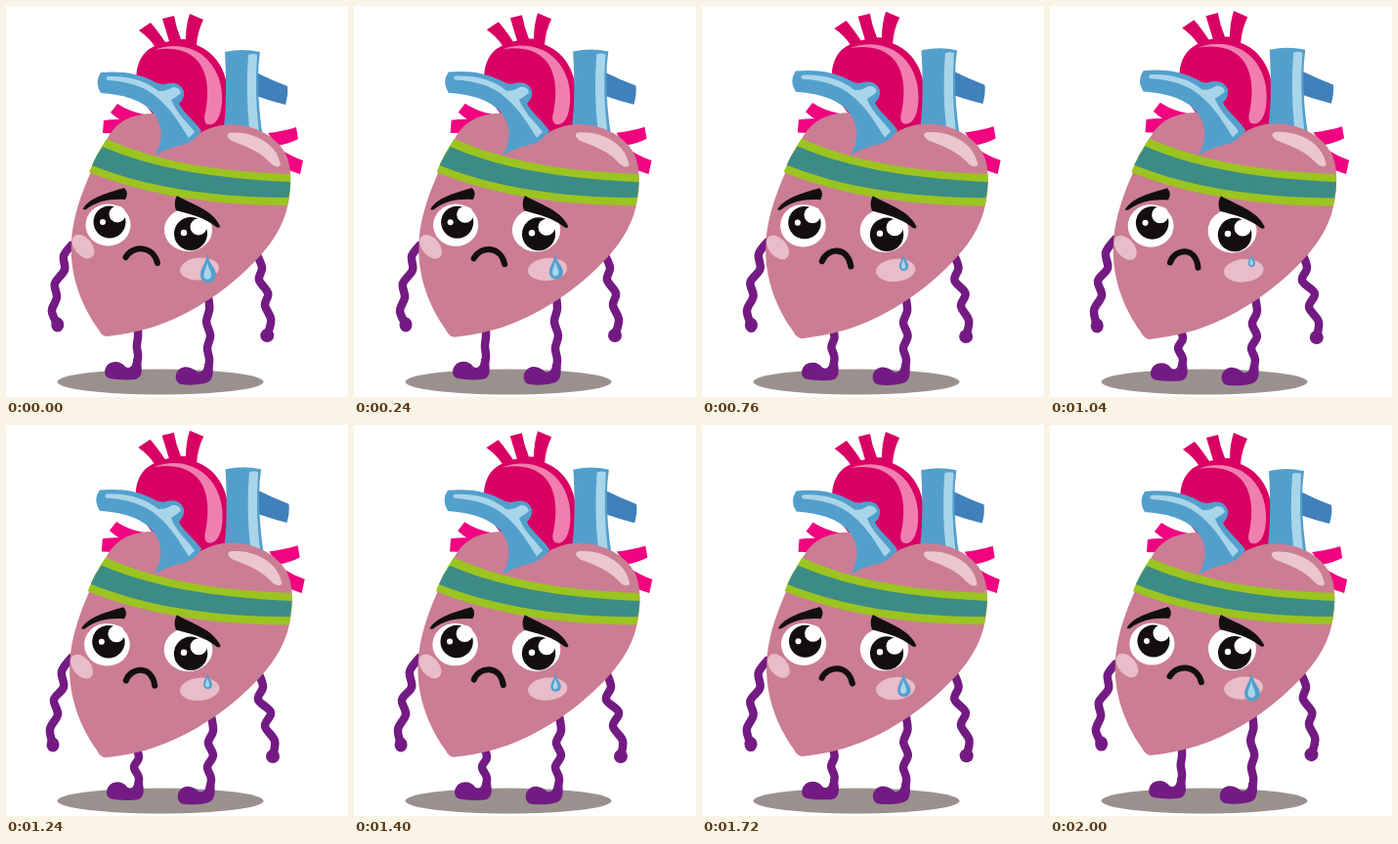
Write an HTML page that moves like this. It is 350 px wide and 400 px high and loops after 2040 ms.

```html
<!DOCTYPE html>
<html lang="en">
<head>
<meta charset="utf-8">
<title>Tired heart</title>
<style>
  html, body { margin: 0; width: 100%; height: 100%; overflow: hidden; background: #fff; }
  svg { display: block; width: 100vw; height: 100vh; }
  .limb { fill: none; stroke: #731b83; stroke-width: 8.5; stroke-linecap: round; stroke-linejoin: round; }
  .purple { fill: #731b83; }
  .pink { fill: #f0047f; }
  .blue { fill: #539fcc; }
  .pale { fill: #a9d5ea; }
  .blush { fill: #e8bcc8; }
  .ink { fill: #130f10; }
</style>
</head>
<body>
<svg viewBox="0 0 350 400">
  <ellipse cx="158" cy="384.5" rx="105.5" ry="13" fill="#9a918e"/>

  <path id="armL" class="limb"/>
  <path id="armR" class="limb"/>
  <path id="legL" class="limb"/>
  <path id="legR" class="limb"/>
  <ellipse id="handL" class="purple" rx="6.5" ry="7.5"/>
  <ellipse id="handR" class="purple" rx="7" ry="7"/>
  <path id="footL" class="purple" d="M137 361C140 372 140 381 131 382C122 383 112 382 106 381C99 379 100 370 105 366C111 362 119 364 122 369C127 372 130 368 130 361Z"/>
  <path id="footR" class="purple" d="M211 366C213 377 211 385 203 386C195 388 186 388 179 387C172 385 172 375 178 371C184 367 191 370 195 374C200 376 203 372 203 366Z"/>

  <g id="heart">
    <g class="pink">
      <path d="M114 100Q126 108 142 111L130 124Q117 118 107 109Z"/>
      <path d="M100 117Q114 115 128 117L114 131Q106 130 99 130Z"/>
      <path d="M268 130Q284 128 297 124L299 136Q290 141 277 143Z"/>
      <path d="M280 146Q292 154 304 158L301 172Q289 168 279 164Z"/>
    </g>

    <path fill="#d80063" d="M136 25L148 17Q155 25 163 37L167 36Q163 23 160 13L172 10Q174 22 179 34L184 34Q184 20 188 8L202 14Q196 26 195 40C214 47 227 66 227 92Q227 112 221 132L180 150L136 92C130 70 134 49 152 41Q146 32 136 25Z"/>
    <path fill="#f07fb0" d="M152 45C165 39 182 40 194 46C212 55 222 75 221 97Q220 117 211 121Q203 123 203 114C208 93 208 70 196 56C185 44 168 42 152 45Z"/>

    <path fill="#4080bb" d="M256 68Q272 76 288 82Q289 91 286 101Q270 97 256 92Z"/>
    <path class="blue" d="M224 47Q242 43 260 47Q258 60 258 75Q258 104 263 135L222 130Q227 100 224 47Z"/>
    <path class="pale" d="M248 50Q253 48 257 50Q254 90 259 129L249 125Q245 88 248 50Z"/>

    <path fill="#cb7d93" d="M104 135C114 117 130 110 152 110L178 142C192 135 202 125 220 122C246 118 275 130 286 151C294 166 292 194 286 213C279 234 265 252 247 269C216 299 177 321 145 330Q123 336 103 338Q98 338 94 330C74 302 65 270 67 241C69 205 87 168 104 135Z"/>
    <path fill="#ebc6cf" d="M228 130C249 127 278 139 281 163Q277 167 270 160C260 149 247 144 231 138Q224 133 228 130Z"/>

    <path class="blue" d="M97 68C117 66 137 69 151 77Q159 82 166 79Q178 77 182 87Q183 95 177 100C182 110 193 117 200 128Q192 139 181 142Q166 145 152 153C161 139 161 123 152 111C142 98 125 91 97 89Q90 78 97 68Z"/>
    <path class="pale" d="M104 72C126 71 144 77 156 87Q163 88 171 83Q178 83 179 89Q176 92 169 96C175 111 186 119 193 129L187 135C178 121 169 105 154 93C142 82 123 77 104 76Q101 74 104 72Z"/>

    <path fill="#9bc420" d="M103 136C150 157 206 169 291 172Q292 188 288 204C211 204 142 193 85 170Q92 152 103 136Z"/>
    <path fill="#3c8b86" d="M99 144C148 165 207 176 291 180Q291 188 289 196C211 196 143 185 88 163Q92 153 99 144Z"/>

    <ellipse class="blush" cx="79" cy="246" rx="14" ry="9" transform="rotate(50 79 246)"/>
    <ellipse class="blush" cx="198" cy="269" rx="20" ry="11.5" transform="rotate(-5 198 269)"/>

    <ellipse cx="104.5" cy="224" rx="23" ry="21.5" fill="#fff"/>
    <ellipse cx="186.5" cy="229" rx="24.5" ry="22" fill="#fff"/>
    <circle class="ink" cx="106" cy="221" r="16.5"/>
    <circle class="ink" cx="189" cy="233" r="17"/>
    <g fill="#fff">
      <circle cx="114" cy="213" r="8.5"/>
      <circle cx="99" cy="221" r="3"/>
      <circle cx="197" cy="226" r="8.5"/>
      <circle cx="182" cy="232" r="3.2"/>
    </g>
    <path class="ink" d="M79 207C87 195 105 191 121 186Q126 191 122 198C107 197 94 199 82 208Q78 209 79 207Z"/>
    <path class="ink" d="M175 194C190 203 211 208 219 225Q219 228 215 226C203 216 188 213 174 209Q171 201 175 194Z"/>
    <path id="mouth" fill="none" stroke="#130f10" stroke-width="6" stroke-linecap="round"/>
  </g>

  <g id="tear">
    <path class="blue" d="M206 253C207 263 215 268 215 275C215 286 199 286 199 275C199 268 205 263 206 253Z"/>
    <path class="pale" d="M206 262C207 269 211 272 210 277Q208 281 204 279C200 275 205 269 206 262Z"/>
  </g>
</svg>
<script>
  const LOOP = 2040, STEP = 40;
  const $ = id => document.getElementById(id);
  const lerp = (a, b, k) => a + (b - a) * k;
  const blend = (a, b, k) => a.map((p, i) => [lerp(p[0], b[i][0], k), lerp(p[1], b[i][1], k)]);

  // Each limb: straight pose, wavy pose
  const limbs = {
    armL: [
      [[67, 245], [59, 256], [60, 270], [50, 284], [52, 298], [47, 312], [53, 326]],
      [[67, 238], [57, 252], [59, 268], [49, 281], [53, 296], [45, 311], [48, 327]]
    ],
    armR: [
      [[257, 255], [262, 268], [259, 280], [268, 294], [265, 306], [271, 321], [267, 337]],
      [[259, 255], [263, 268], [258, 281], [271, 294], [265, 308], [275, 323], [273, 339]]
    ],
    legL: [
      [[135, 328], [135, 338], [134, 348], [135, 358], [133, 373]],
      [[132, 328], [136, 340], [131, 350], [136, 361], [134, 373]]
    ],
    legR: [
      [[207, 298], [208, 310], [205, 323], [209, 337], [206, 350], [208, 362], [206, 378]],
      [[210, 298], [212, 313], [207, 325], [212, 338], [206, 350], [210, 362], [207, 378]]
    ]
  };

  // Smooth curve through the points
  function spline(pts) {
    let d = `M${pts[0]}`;
    for (let i = 0; i < pts.length - 1; i++) {
      const a = pts[i - 1] || pts[i], b = pts[i], c = pts[i + 1], e = pts[i + 2] || c;
      d += `C${b.map((v, j) => v + (c[j] - a[j]) / 6)} ${c.map((v, j) => v - (e[j] - b[j]) / 6)} ${c}`;
    }
    return d;
  }

  const scaleAt = (x, y, s) => `translate(${x} ${y}) scale(${s}) translate(${-x} ${-y})`;

  function draw(t) {
    const swell = 1 - Math.abs(2 * t / LOOP - 1);
    const wave = (1 - Math.cos(2 * Math.PI * (t - 240) / LOOP)) / 2;
    const sway = wave * wave * (3 - 2 * wave);

    $('heart').setAttribute('transform', scaleAt(183, 173, 1 + 0.018 * swell));
    $('tear').setAttribute('transform', scaleAt(206, 253.5, 1 - 0.56 * swell));

    const left = [lerp(122.5, 124, swell), lerp(257, 261, swell)];
    const right = [lerp(155, 152, swell), lerp(263, 266, swell)];
    $('mouth').setAttribute('d', `M${left}C129 ${lerp(245, 246, swell)} 150 ${lerp(244, 245, swell)} ${right}`);

    for (const id in limbs) {
      const pts = blend(...limbs[id], sway);
      $(id).setAttribute('d', spline(pts));
      if (id.startsWith('arm')) {
        const hand = $(id.replace('arm', 'hand')), [x, y] = pts[pts.length - 1];
        hand.setAttribute('cx', x);
        hand.setAttribute('cy', y);
      }
    }
    $('footL').setAttribute('transform', `translate(${lerp(0, 2, sway)} ${lerp(0, 1.5, sway)})`);
    $('footR').setAttribute('transform', `translate(${lerp(0, 2, sway)} ${lerp(0, 0.7, sway)})`);
  }

  const start = performance.now();
  function tick() {
    const t = (performance.now() - start) % LOOP;
    draw(Math.floor(t / STEP) * STEP);
    requestAnimationFrame(tick);
  }
  draw(0);
  requestAnimationFrame(tick);
</script>
</body>
</html>
```
